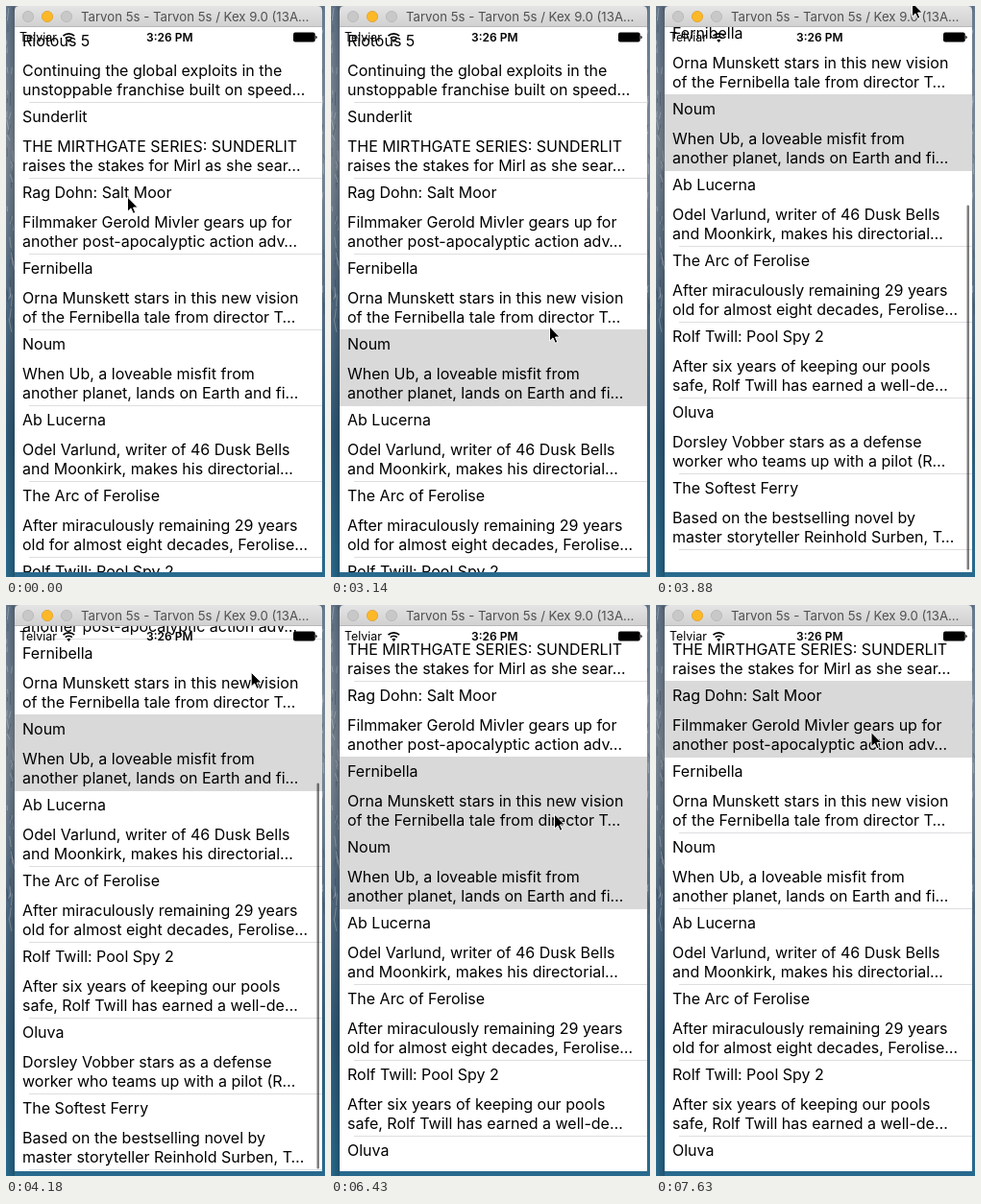
These frames come from a looping animation (332x595 px, 8 s). An HTML page:

```html
<!DOCTYPE html>
<html lang="en">
<head>
<meta charset="utf-8">
<title>Film list</title>
<style>
  html, body { margin: 0; width: 100%; height: 100%; overflow: hidden; }
  svg { display: block; font-family: Inter, sans-serif; }
  #list text { font-size: 16px; }
  #status { font-size: 12px; }
</style>
</head>
<body>
<svg width="332" height="595" viewBox="0 0 332 595">
  <defs>
    <linearGradient id="wall" x2="0" y2="1">
      <stop offset="0" stop-color="#66798e"/>
      <stop offset=".25" stop-color="#7d8996"/>
      <stop offset=".5" stop-color="#566d83"/>
      <stop offset=".75" stop-color="#2f5a78"/>
      <stop offset="1" stop-color="#286a8e"/>
    </linearGradient>
    <linearGradient id="edge">
      <stop offset="0" stop-opacity="0"/>
      <stop offset="1" stop-opacity=".22"/>
    </linearGradient>
    <linearGradient id="bar" x2="0" y2="1">
      <stop offset="0" stop-color="#e4e4e4"/>
      <stop offset="1" stop-color="#d0d0d0"/>
    </linearGradient>
    <clipPath id="screen"><rect x="9" y="22" width="320" height="568"/></clipPath>
  </defs>

  <rect width="332" height="595" fill="url(#wall)"/>
  <g id="streaks" stroke-opacity=".4"></g>
  <rect width="9" height="595" fill="url(#edge)"/>

  <rect x="9" y="22" width="320" height="568" fill="#fff"/>
  <g clip-path="url(#screen)">
    <g id="list"></g>
    <rect id="thumb" x="323.5" width="2.5" rx="1.25"/>
    <g id="status">
      <text x="14" y="37" font-size="12.4">Telviar</text>
      <text x="146" y="37" font-weight="600">3:26 PM</text>
      <path d="M59.5 31.2a8.2 8.2 0 0 1 11.6 0M61.8 33.7a5 5 0 0 1 7 0" fill="none" stroke="#000" stroke-width="1.7"/>
      <path d="M65.3 38l-2-2.2a2.9 2.9 0 0 1 4 0z"/>
      <rect x="299" y="27.5" width="22.7" height="10" rx="2"/>
      <path d="M322.3 30.7v3.8q1.4-.4 1.4-1.9t-1.4-1.9z"/>
    </g>
  </g>

  <path d="M9 22V5q0-5 5-5h310q5 0 5 5v17z" fill="url(#bar)"/>
  <path d="M9 21.5h320" stroke="#b8b8b8"/>
  <g stroke-width=".8" fill="#c8c8c8" stroke="#b5b5b5">
    <circle cx="23" cy="11" r="5.6"/>
    <circle cx="43" cy="11" r="5.6" fill="#fdb827" stroke="#e0a02a"/>
    <circle cx="63" cy="11" r="5.6"/>
  </g>
  <text x="78" y="16" font-size="13.2" fill="#505050">Tarvon 5s - Tarvon 5s / Kex 9.0 (13A…</text>

  <path id="cursor" d="M0 0V15.2L3.5 11.9L5.9 17.3L8.3 16.3L6 11H10.8Z" stroke="#fff" stroke-linejoin="round"/>
</svg>

<script>
const films = [
  ["Riotous 5", "Continuing the global exploits in the", "unstoppable franchise built on speed…"],
  ["Sunderlit", "THE MIRTHGATE SERIES: SUNDERLIT", "raises the stakes for Mirl as she sear…"],
  ["Rag Dohn: Salt Moor", "Filmmaker Gerold Mivler gears up for", "another post-apocalyptic action adv…"],
  ["Fernibella", "Orna Munskett stars in this new vision", "of the Fernibella tale from director T…"],
  ["Noum", "When Ub, a loveable misfit from", "another planet, lands on Earth and fi…"],
  ["Ab Lucerna", "Odel Varlund, writer of 46 Dusk Bells", "and Moonkirk, makes his directorial…"],
  ["The Arc of Ferolise", "After miraculously remaining 29 years", "old for almost eight decades, Ferolise…"],
  ["Rolf Twill: Pool Spy 2", "After six years of keeping our pools", "safe, Rolf Twill has earned a well-de…"],
  ["Oluva", "Dorsley Vobber stars as a defense", "worker who teams up with a pilot (R…"],
  ["The Softest Ferry", "Based on the bestselling novel by", "master storyteller Reinhold Surben, T…"]
];

const LOOP = 8000, TICK = 149.4, LEAD = 5;
const TOP = 22, VIEW = 568, ROW = 79;
const CONTENT = films.length * ROW, MAX_SCROLL = CONTENT - VIEW;
const PRESS = 21, RELEASE = 25, DROP = 30;
const PUSH_FROM = 317, PULL_FROM = 96;

const linear = p => p;
const easeIn = p => p * p;
const easeOut = p => 1 - (1 - p) ** 3;
const smooth = p => p * p * (3 - 2 * p);
const clamp = p => Math.min(1, Math.max(0, p));
const $ = id => document.getElementById(id);

// Pointer moves: begin, end, target x, target y, easing.
const moves = [
  [0, 1, 225, 344, linear],
  [20, PRESS, 227.5, 334, linear],
  [PRESS, 23, 257, 187, easeIn],
  [23, 26, 266.5, -4, easeOut],
  [27, DROP, 232.5, 218, linear],
  [45, 47, 224, 132.5, smooth]
];
// Tapped rows; the previous row fades one tick after the next tap.
const taps = [{ tick: 5, row: 4 }, { tick: 43, row: 3 }, { tick: 50, row: 2 }];

function pointerAt(tick) {
  let x = 126.5, y = 199;
  for (const [begin, end, toX, toY, ease] of moves) {
    const p = ease(clamp((tick - begin) / (end - begin)));
    x += (toX - x) * p;
    y += (toY - y) * p;
  }
  return { x, y };
}

function rubberBand(pull) {
  const soft = Math.max(0, pull) * 0.55;
  return soft / (1 + soft / VIEW);
}

// Drag up past the end, spring back, then drag down again.
function scrollAt(tick) {
  if (tick <= PRESS) return 0;
  const pushed = Math.max(0, PUSH_FROM - pointerAt(Math.min(tick, RELEASE)).y);
  const over = rubberBand(pushed - MAX_SCROLL);
  if (tick <= RELEASE) return Math.min(pushed, MAX_SCROLL) + over;
  const pulled = Math.max(0, pointerAt(Math.min(tick, DROP)).y - PULL_FROM);
  return MAX_SCROLL + over * 0.5 ** ((tick - RELEASE) ** 1.5) - pulled;
}

function isSelected(row, tick) {
  return taps.some((tap, i) =>
    tap.row === row && tick >= tap.tick && !(tick > taps[i + 1]?.tick));
}

function drawStreaks() {
  let seed = 7;
  const random = () => (seed = seed * 16807 % 2147483647) / 2147483647;
  let html = "";
  for (let i = 0; i < 60; i++) {
    const y = 330 * random(), x = i % 4 ? 7 * random() : 330;
    const color = random() < 0.55 ? "#d3dae1" : "#3c4c5e";
    html += `<path d="M${x} ${y}l${6 * random() - 3} ${4 + 10 * random()}" stroke="${color}"/>`;
  }
  $("streaks").innerHTML = html;
}

function drawRows() {
  const baselines = [20, 51, 71];
  $("list").innerHTML = films.map((lines, i) => `
    <g transform="translate(0 ${TOP + i * ROW})">
      <path d="M24 78.5H329" stroke="#dedee1"/>
      <rect class="shade" x="9" y="-1" width="320" height="80" fill="#d9d9d9"/>
      ${lines.map((line, k) => `<text x="17" y="${baselines[k]}">${line}</text>`).join("")}
    </g>`).join("");
}

function drawThumb(tick, offset) {
  const over = Math.max(0, offset - MAX_SCROLL);
  const thumb = $("thumb");
  thumb.setAttribute("y", TOP + 3 + (offset - over) * VIEW / CONTENT + over);
  thumb.setAttribute("height", 403 - over);
  thumb.setAttribute("opacity", offset ? 0.5 * clamp((DROP + 2 - tick) / 2) : 0);
}

function draw(time) {
  const tick = Math.floor((time % LOOP + LEAD) / TICK);
  const { x, y } = pointerAt(tick), offset = Math.round(scrollAt(tick));
  $("cursor").setAttribute("transform", `translate(${x} ${y})`);
  $("list").setAttribute("transform", `translate(0 ${-offset})`);
  drawThumb(tick, offset);
  shades.forEach((shade, row) => shade.setAttribute("opacity", +isSelected(row, tick)));
}

drawStreaks();
drawRows();
const shades = document.querySelectorAll(".shade");
const begin = performance.now();
function loop() {
  draw(performance.now() - begin);
  requestAnimationFrame(loop);
}
loop();
</script>
</body>
</html>
```
